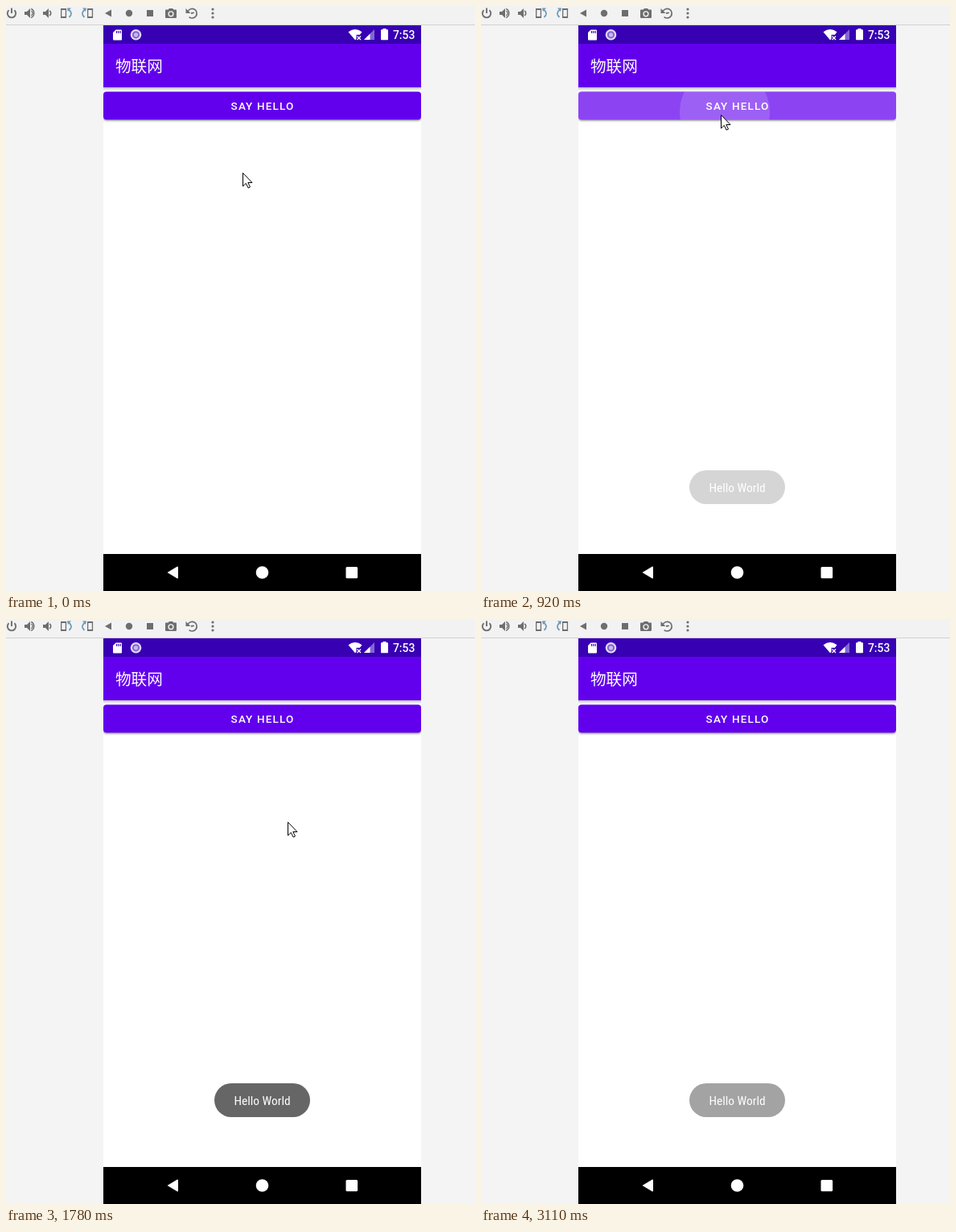
Write an HTML page with a canvas that moves like this. It is 583x727 px and loops after 3.18 s.

```html
<!DOCTYPE html>
<html lang="zh">
<head>
<meta charset="utf-8">
<title>物联网</title>
<style>
html, body { margin: 0; width: 100%; height: 100%; overflow: hidden; background: #f4f4f4; }
canvas { display: block; }
</style>
</head>
<body>
<canvas id="stage" width="583" height="727"></canvas>
<script>
const ctx = document.getElementById('stage').getContext('2d');
const LOOP = 3180;
const PURPLE = '#6200ee', GREY = '#6e6e6e', BLUE = '#6b9ab8';
const ROBOTO = 'Roboto, "Noto Sans", sans-serif';

const TICKS = [0, 210, 290, 370, 450, 530, 620, 700, 770, 840, 920, 990, 1070, 1130, 1210,
  1310, 1380, 1630, 1710, 1790, 1870, 1940, 2020, 2100, 2170, 2880, 2960, 3040, 3110];

const TOAST = [[840, 0], [920, .27], [1070, .71], [1210, .93], [1310, .98], [1380, 1],
  [2800, 1], [2880, .95], [2960, .86], [3040, .74], [3110, .6]];
const TINT = [[560, 0], [620, .04], [770, .045], [840, .17], [920, .265], [1070, .166],
  [1210, .07], [1310, .04], [1380, 0]];
const RIPPLE = [[770, 0], [840, .1], [920, .15], [1070, .077], [1210, .01], [1310, 0]];

function track(keys, t) {
  if (t <= keys[0][0]) return keys[0][1];
  for (let i = 1; i < keys.length; i++) {
    const [t0, v0] = keys[i - 1], [t1, v1] = keys[i];
    if (t <= t1) return v0 + (v1 - v0) * (t - t0) / (t1 - t0);
  }
  return keys[keys.length - 1][1];
}

function ease(t, from, to) {
  const p = Math.min(1, Math.max(0, (t - from) / (to - from)));
  return p * p * (3 - 2 * p);
}

function rect(x, y, w, h, color) {
  ctx.fillStyle = color;
  ctx.fillRect(x, y, w, h);
}

function round(x, y, w, h, r, color) {
  ctx.beginPath();
  ctx.roundRect(x, y, w, h, r);
  ctx.fillStyle = color;
  ctx.fill();
}

function disc(x, y, r, color) {
  ctx.beginPath();
  ctx.arc(x, y, r, 0, 7);
  ctx.fillStyle = color;
  ctx.fill();
}

function shape(d, color) {
  ctx.fillStyle = color;
  ctx.fill(new Path2D(d));
}

function line(d, color, width) {
  ctx.strokeStyle = color;
  ctx.lineWidth = width;
  ctx.stroke(new Path2D(d));
}

function text(str, x, y, font, color, align = 'left', spacing = 0) {
  ctx.font = font;
  ctx.letterSpacing = spacing + 'px';
  ctx.textAlign = align;
  ctx.fillStyle = color;
  ctx.fillText(str, x, y);
  ctx.letterSpacing = '0px';
}

function drawToolbar() {
  rect(0, 0, 583, 23, '#f2f2f2');
  rect(0, 23, 583, 1, '#d1d1d1');

  // power
  line('M3.6 5.2A5.2 5.2 0 1 0 10.4 5.2M7 2.5V9', GREY, 1.9);

  // volume up and down
  shape('M23 7H26L30 3V15L26 11H23Z', GREY);
  line('M31.3 6A3.4 3.4 0 0 1 31.3 12M31.2 3.5A6 6 0 0 1 31.2 14.5', GREY, 1.4);
  shape('M46 7H49L53 3V15L49 11H46Z', GREY);
  line('M54 6A3.4 3.4 0 0 1 54 12', GREY, 1.6);

  // rotate left and right
  for (const x of [68, 101]) {
    ctx.strokeStyle = GREY;
    ctx.lineWidth = 1.3;
    ctx.strokeRect(x + .65, 3.65, 5.8, 10.7);
    rect(x, 3, 7, 2, GREY);
    rect(x, 13, 7, 2, GREY);
  }
  line('M78 4.5Q84 9 78.5 14', BLUE, 1.7);
  shape('M76 2.5H81L77 7Z', BLUE);
  line('M98 4.5Q92 9 97.5 14', BLUE, 1.7);
  shape('M100 2.5H95L99 7Z', BLUE);

  // back, home, overview
  shape('M123 9L131 4.5V13.5Z', GREY);
  disc(153, 9, 4.2, GREY);
  rect(175, 5, 8, 8, GREY);

  // camera
  shape('M198 5.5Q198 4.5 199 4.5H201.5L203 3H207L208.5 4.5H211Q212 4.5 212 5.5V14Q212 15 211 15H199Q198 15 198 14Z', GREY);
  disc(205, 9.8, 3.6, '#f2f2f2');
  disc(205, 9.8, 2.2, GREY);

  // history
  line('M226 7A5.8 5.8 0 1 1 227.6 13.6M231 10V8.5H234', GREY, 1.7);
  shape('M223.5 3V9H229.5Z', GREY);

  for (const y of [4, 9, 14]) disc(257, y, 1.6, GREY);
}

function drawBars() {
  // app bar and its shadow
  const shade = ctx.createLinearGradient(0, 101, 0, 106);
  shade.addColorStop(0, '#b9b6c0');
  shade.addColorStop(.5, '#e6e5e8');
  shade.addColorStop(1, '#fff');
  rect(121, 101, 395, 5, shade);
  rect(121, 47, 395, 54, PURPLE);
  text('物联网', 136, 81.5, '19.6px "Noto Sans CJK SC", "Noto Sans CJK", sans-serif', '#fff');

  // status bar
  rect(121, 24, 395, 23, '#3700b3');
  shape('M136.5 29.5H143Q144 29.5 144 30.5V41.5Q144 42.5 143 42.5H134Q133 42.5 133 41.5V33Z', '#fff');
  for (const x of [137, 139.3, 141.6]) rect(x, 31, 1.2, 2.8, '#3700b3');
  disc(161.5, 35.8, 6.8, '#e2daf5');
  disc(161.5, 35.8, 4.6, '#8165d0');
  disc(161.5, 35.8, 2.6, '#c7b9eb');

  shape('M425.5 32.3Q434 25.8 442.5 32.3L439.8 35.8H435.5V41L434 42.2Z', '#fff');
  line('M436.5 37.5L441 42M441 37.5L436.5 42', '#fff', 1.3);
  shape('M445 42L458 29V42Z', '#8466d0');
  shape('M445 42L452.5 34.5V42Z', '#fff');
  round(466, 29.3, 9, 12.9, 1, '#fff');
  rect(468.5, 28, 4, 2, '#fff');
  text('7:53', 508.3, 41, '500 13.9px ' + ROBOTO, '#fff', 'right');

  // navigation bar
  rect(121, 681, 395, 46, '#000');
  shape('M200.5 704L212.6 696.8Q214 696 214 697.5V710.5Q214 712 212.6 711.2Z', '#fff');
  disc(318.5, 704, 7.8, '#fff');
  round(422.5, 697, 14.6, 14.2, 1.5, '#fff');
}

function drawButton(t) {
  const pressed = t >= 770 && t < 920;
  ctx.save();
  ctx.beginPath();
  ctx.rect(121, 102, 395, 60);
  ctx.clip();
  ctx.shadowColor = pressed ? 'rgba(0,0,0,.42)' : 'rgba(0,0,0,.45)';
  ctx.shadowBlur = pressed ? 6 : 2.5;
  ctx.shadowOffsetY = pressed ? 3 : 1.2;
  round(121, 106.5, 395, 34.7, 4, PURPLE);
  ctx.restore();

  ctx.save();
  ctx.beginPath();
  ctx.roundRect(121, 106.5, 395, 34.7, 4);
  ctx.clip();
  rect(121, 106, 395, 36, `rgba(255,255,255,${track(TINT, t)})`);
  const glow = track(RIPPLE, t);
  if (glow > 0) {
    const grow = (t - 920) / 150;
    disc(303 + grow, 132 - grow, Math.max(0, 56 + 42 * grow), `rgba(255,255,255,${glow})`);
  }
  ctx.restore();
  text('SAY HELLO', 319.1, 129.4, '500 13.45px ' + ROBOTO, '#fff', 'center', 1.2);
}

// Falls back to a smaller regular face where no condensed one is available.
function toastFont() {
  const font = size => `condensed ${size}px "Roboto Condensed", ${ROBOTO}`;
  ctx.font = font(15.4);
  const width = ctx.measureText('Hello World').width;
  return font(width > 74 ? 13.8 : 15.4);
}
const TOAST_FONT = toastFont();

function drawToast(t) {
  const alpha = track(TOAST, t);
  if (!alpha) return;
  ctx.globalAlpha = alpha;
  round(259, 577, 119, 42, 21, '#666');
  ctx.globalAlpha = 1;
  text('Hello World', 318.5, 604, TOAST_FONT, '#fff', 'center');
}

function drawCursor(t) {
  if (t >= 2170) return;
  const enter = ease(t, 140, 700), leave = ease(t, 1560, 2100);
  const x = 294 + 4 * enter + 277 * leave;
  const y = 207 - 72 * enter + 11 * ease(t, 1240, 1380) + 564 * leave;
  ctx.save();
  ctx.translate(Math.round(x) + .5, Math.round(y) + .5);
  const arrow = 'M0 0V16.5L3.8 12.9L6.6 18.6L9 17.5L6.3 12H11.5Z';
  shape(arrow, '#fff');
  line(arrow, '#000', 1);
  ctx.restore();
}

function draw(t) {
  rect(0, 0, 583, 727, '#f4f4f4');
  drawToolbar();
  rect(121, 24, 395, 657, '#fff');
  drawBars();
  drawButton(t);
  drawToast(t);
  drawCursor(t);
}

const start = performance.now();
function frame() {
  const now = (performance.now() - start) % LOOP;
  draw(TICKS.findLast(tick => tick <= now));
  requestAnimationFrame(frame);
}
frame();
</script>
</body>
</html>
```
